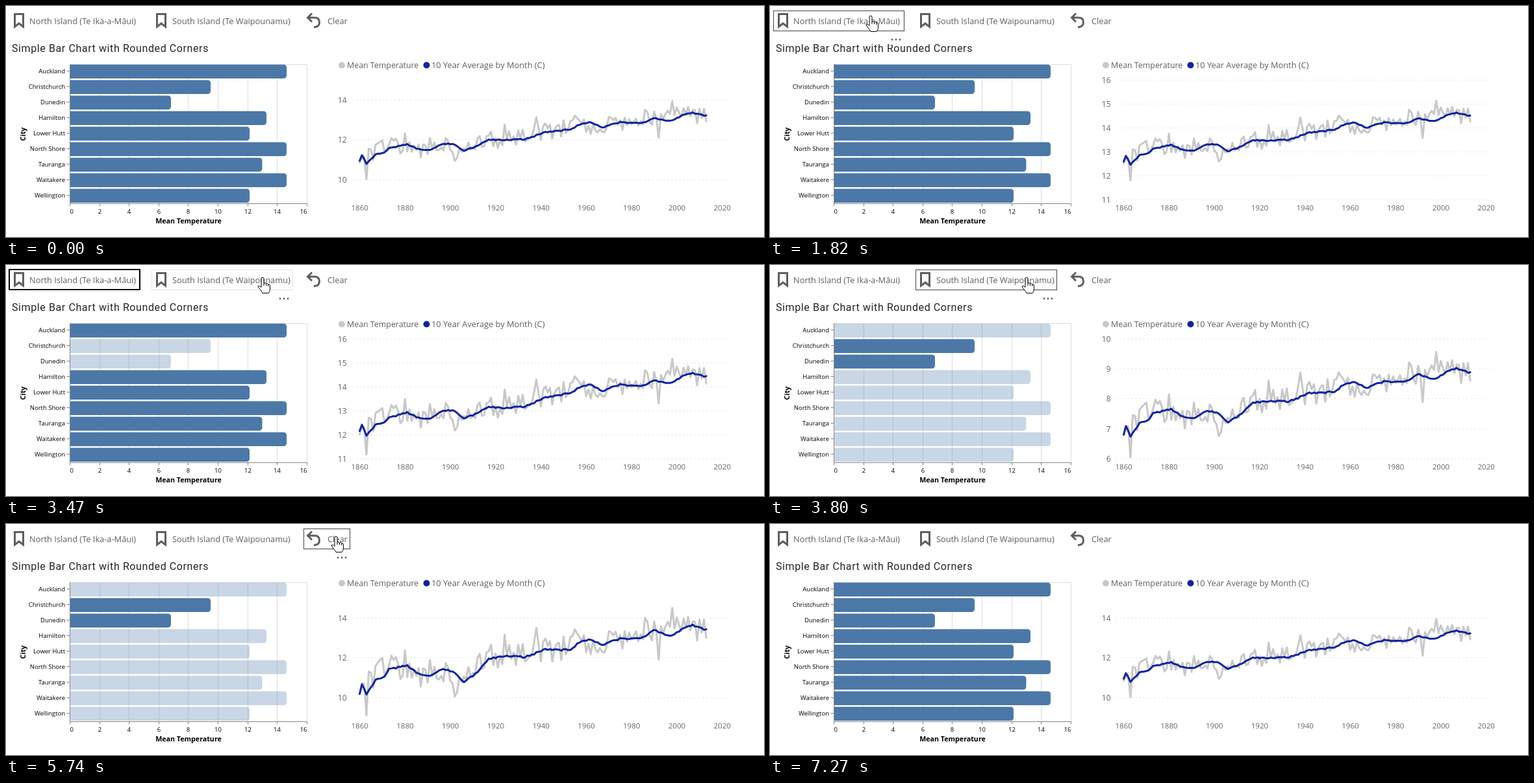
Write an HTML page that moves like this. It is 1167 by 357 pixels and loops after 9.35 s.

```html
<!DOCTYPE html>
<html lang="en">
<head>
<meta charset="utf-8">
<style>
  html, body { margin: 0; width: 100%; height: 100%; overflow: hidden; background: #fff; }
  svg { display: block; font-family: "Open Sans", "Noto Sans", sans-serif; }
  .ui { font-size: 12.8px; fill: #605e5c; }
  .small { font-size: 9.5px; fill: #000; }
  .bold { font-size: 10.7px; font-weight: bold; text-anchor: middle; }
  .title { font: 16px Roboto, sans-serif; letter-spacing: .6px; fill: #252423; }
  .tick { font-size: 12px; fill: #666; }
  .icon { fill: none; stroke: #605e5c; stroke-width: 3; }
  .frame { fill: none; shape-rendering: crispEdges; }
  .line { fill: none; stroke-width: 3; stroke-linejoin: round; stroke-linecap: round; }
  .dotted { stroke: #ccc; stroke-dasharray: 1 5; }
  .mid { text-anchor: middle; }
  .end { text-anchor: end; }
</style>
</head>
<body>
<svg id="stage" width="1167" height="357" viewBox="0 0 1167 357"></svg>
<script>
const LOOP = 9350, MOVE = 360, YEARS = 154;

// Linear interpolation between rows of [position, ...values].
function between(rows, pos) {
  const i = Math.max(1, rows.findIndex(r => r[0] >= pos));
  const [a, ...from] = rows[i - 1], [b, ...to] = rows[i];
  const p = (pos - a) / (b - a);
  return from.map((v, n) => v + (to[n] - v) * p);
}
const ease = p => p < .5 ? 4 * p ** 3 : 1 - 4 * (1 - p) ** 3;
const noise = n => {
  const s = Math.sin(n * 12.9898 + 4) * 43758.5453;
  return 2 * (s - Math.floor(s)) - 1;
};

// Vertical scales of the line chart: lowest tick, its y, pixels per degree.
const scales = {
  all: { low: 10, high: 14, step: 2, y: 268.6, k: 30.85 },
  north: { low: 11, high: 16, step: 1, y: 299.6, k: 37.1 },
  south: { low: 6, high: 10, step: 1, y: 299.6, k: 46.4 }
};
const toY = (s, v) => s.y - (v - s.low) * s.k;

// Key points of the running average: years after 1860, all cities, southern cities.
const trend = [
  [0, 10.93, 6.7], [1, 11.22, 7.05], [3, 10.8, 6.72], [7, 11.28, 7.24], [11, 11.35, 7.32],
  [13, 11.58, 7.61], [21, 11.77, 7.72], [26, 11.54, 7.44], [31, 11.48, 7.35], [37, 11.82, 7.61],
  [41, 11.8, 7.5], [46, 11.45, 7.13], [52, 11.7, 7.48], [57, 12, 7.95], [64, 12, 8.08],
  [73, 12.03, 8.02], [82, 12.38, 8.28], [93, 12.52, 8.25], [97, 12.77, 8.53], [102, 12.87, 8.6],
  [107, 12.62, 8.43], [115, 12.9, 8.66], [124, 12.81, 8.64], [130, 13.1, 8.97], [137, 12.94, 8.73],
  [143, 13.26, 9.01], [147, 13.36, 9.12], [153, 13.2, 8.94]];
const extremes = { 3: -1.25, 20: .7, 42: -.5, 64: .75, 78: .75, 132: -.85, 138: .75 };

// The average trails the yearly values, so those follow the trend some years ahead.
const LAG = 4;
const average = i => between(trend, i).map(v => v + .03 * noise(i + 500));
const yearly = i => between(trend, Math.min(i + LAG, YEARS - 1))
  .map(v => v + (extremes[i] ?? .42 * noise(i)));

const curves = { all: [], north: [], south: [] };
[yearly, average].forEach((series, n) => {
  for (const name in curves) curves[name][n] = [];
  for (let i = 0; i < YEARS; i++) {
    const [all, south] = series(i);
    // Seven of the nine cities are in the north, two in the south.
    const temps = { all, south, north: (9 * all - 2 * south) / 7 };
    for (const name in curves) curves[name][n].push(toY(scales[name], temps[name]));
  }
});

const cities = {
  Auckland: 14.63, Christchurch: 9.5, Dunedin: 6.82, Hamilton: 13.27, "Lower Hutt": 12.13,
  "North Shore": 14.63, Tauranga: 12.98, Waitakere: 14.63, Wellington: 12.13
};
const southern = ["Christchurch", "Dunedin"];

// Each click: line motion starts, bars switch, states before and after.
const clicks = [
  { start: 1730, bars: 1920, from: "all", to: "north" },
  { start: 3607, bars: 3790, from: "north", to: "south" },
  { start: 5628, bars: 5830, from: "south", to: "all" }];

const buttons = [
  { x: 5, w: 201, dots: 194, hover: 960, menu: 1400, press: 1730, leave: 2400, end: 3600 },
  { x: 224, w: 217, dots: 428, hover: 2430, menu: 2620, press: 3600, leave: 4350, end: 5620 },
  { x: 458, w: 71, dots: 517, hover: 4480, menu: 4520, press: 5620, leave: 6490, end: 7200 }];

// Cursor: time, x, y.
const route = [
  [900, 3, 39], [1650, 155, 16], [2330, 155, 16], [2510, 299, 22], [2990, 395, 20],
  [4270, 395, 20], [4570, 488, 23], [4810, 508, 20], [6460, 508, 20], [7260, 1124, 13]];

const text = (x, y, s, cls, more = "") => `<text x="${x}" y="${y}" class="${cls}" ${more}>${s}</text>`;
const path = (d, more) => `<path d="${d}" ${more}/>`;
const dot = (x, y, r, fill) => `<circle cx="${x}" cy="${y}" r="${r}" fill="${fill}"/>`;
const bookmark = x => path(`M${x} 12.5h13v19.5l-6.5-5-6.5 5z`, 'class="icon"');

function barChart() {
  let s = "";
  for (let i = 0; i <= 8; i++) {
    const x = 98.5 + Math.round(i * 45.6);
    const cls = "small " + (i === 0 ? "" : i === 8 ? "end" : "mid");
    s += path(`M${x} 90.5V305`, 'stroke="#ddd"') + path(`M${x} 305v4.5`, 'stroke="#888"');
    s += text(x, 320.5, i * 2, cls);
  }
  s += path("M98.5 90.5H463.5", 'stroke="#ddd"');
  Object.entries(cities).forEach(([name, temp], i) => {
    const y = 90.5 + i * 24, end = 98.5 + temp * 22.8;
    s += path(`M98.5 ${y}H${end - 5}q5 0 5 5v11.5q0 5-5 5H98.5z`, `class="bar" data-city="${name}" fill="#4c78a8"`);
    s += path(`M93.5 ${y + 10}H98.5`, 'stroke="#888"') + text(91, y + 13.3, name, "small end");
  });
  return s + path("M98.5 90V305.5H464", 'fill="none" stroke="#888"') +
    text(281, 336, "Mean Temperature", "bold") +
    text(0, 0, "City", "bold", 'transform="translate(30 198) rotate(-90)"');
}

function lineChart() {
  let s = dot(517, 91.5, 5, "#c8c8c8") + dot(647.5, 91.5, 5, "#12239e") +
    text(525, 96, "Mean Temperature", "ui", 'style="font-size:12.4px"') +
    text(655, 96, "10 Year Average by Month (C)", "ui");
  for (let i = 0; i <= 8; i++) s += text(544.7 + i * 69.75, 316, 1860 + i * 20, "tick mid", 'style="font-size:11.6px"');
  for (const [name, scale] of Object.entries(scales)) {
    s += `<g id="${name}">`;
    for (let v = scale.low; v <= scale.high; v += scale.step) {
      const y = toY(scale, v);
      s += path(`M533 ${Math.floor(y) + .5}H1114`, 'class="dotted"') + text(524.5, y + 4.5, v, "tick end");
    }
    s += "</g>";
  }
  return s + `<path class="line" stroke="#c8c8c8"/><path class="line" stroke="#12239e"/>`;
}

const stage = document.getElementById("stage");
stage.innerHTML =
  buttons.map(b => `<rect class="frame" x="${b.x}" y="7" width="${b.w}" height="31"/>`).join("") +
  bookmark(13.5) + text(36, 28, "North Island (Te Ika-a-Māui)", "ui") +
  bookmark(232.5) + text(256, 28, "South Island (Te Waipounamu)", "ui") +
  path("M471 11.5l-6.5 6.5 6.5 6.5M465 18h10q7.5 0 7.5 7.3T474 32.7", 'class="icon"') +
  text(495, 28, "Clear", "ui") +
  text(9, 71, "Simple Bar Chart with Rounded Corners", "title") +
  barChart() + lineChart() +
  buttons.map(b => `<g class="menu"><rect x="${b.dots - 11}" y="44" width="22" height="16" fill="#fff"/>` +
    [-6, 0, 6].map(d => dot(b.dots + d, 52, 1.4, "#605e5c")).join("") + "</g>").join("") +
  `<g id="cursor" fill="#fff" stroke="#000" stroke-linejoin="round">
    <path id="hand" d="M-2 1q0-1.8 2-1.8t2 1.8v7q2.5-.8 3.5.8 2.5-.6 3.2.9 2.8-.3 2.8 2.3v5q0 4-2.5 6.5h-9q-1.5-3-4-6-2.3-2.7-3-4.5 1-2 3.5 0l1.5 1.5zM2 8v4M5.5 9v3M8.7 10v3"/>
    <path id="arrow" d="M0 0v16l3.7-3.5 2.4 5.6 2.5-1.1-2.4-5.4h5z"/>
  </g>`;

const all = sel => [...stage.querySelectorAll(sel)];
const byId = id => document.getElementById(id);
const show = (el, on) => el.setAttribute("visibility", on ? "visible" : "hidden");
const bars = all(".bar"), lines = all(".line"), frames = all(".frame"), menus = all(".menu");

function drawCharts(t) {
  const click = clicks.findLast(c => t >= c.start) || { start: 0, from: "all", to: "all" };
  const p = ease(Math.min(1, (t - click.start) / MOVE));
  lines.forEach((line, n) => {
    const a = curves[click.from][n], b = curves[click.to][n];
    line.setAttribute("d", "M" + a.map((y, i) =>
      `${(544.5 + i * 3.4875).toFixed(2)} ${(y + (b[i] - y) * p).toFixed(2)}`).join("L"));
  });
  for (const name in scales) show(byId(name), name === click.to);

  const picked = clicks.findLast(c => t >= c.bars)?.to || "all";
  for (const bar of bars) {
    const on = picked === "all" || southern.includes(bar.dataset.city) === (picked === "south");
    bar.setAttribute("opacity", on ? 1 : .3);
  }
}

function drawButtons(t) {
  buttons.forEach((b, i) => {
    const [color, width] = t < b.press ? ["#e6e6e6", 1] : t < b.leave ? ["#444", 1] : ["#000", 2];
    frames[i].setAttribute("stroke", color);
    frames[i].setAttribute("stroke-width", width);
    show(frames[i], t >= b.hover && t < b.end);
    show(menus[i], t >= b.menu && t < b.leave);
  });
}

function drawCursor(t) {
  const visible = t > route[0][0] && t < route.at(-1)[0];
  show(byId("cursor"), visible);
  if (!visible) return;
  const [x, y] = between(route, t);
  const over = y < 38 && buttons.some(b => x > b.x && x < b.x + b.w);
  byId("cursor").setAttribute("transform", `translate(${x} ${y})`);
  byId("hand").style.display = over ? "" : "none";
  byId("arrow").style.display = over ? "none" : "";
}

function frame(now) {
  const t = now % LOOP;
  drawCharts(t);
  drawButtons(t);
  drawCursor(t);
  requestAnimationFrame(frame);
}
frame(performance.now());
</script>
</body>
</html>
```
